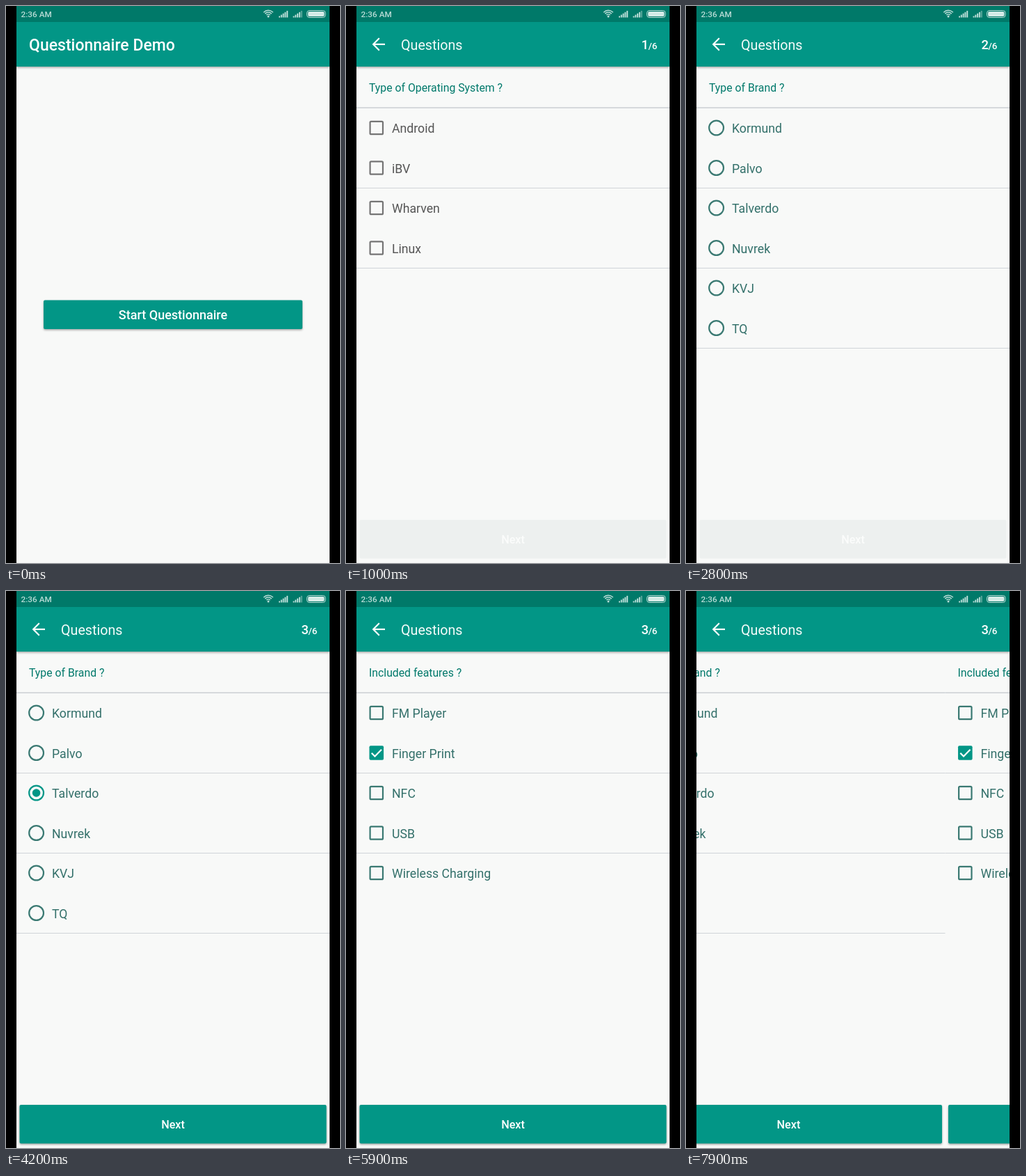
An HTML page with a canvas that plays this animation: 480x800 px, repeating every 8000 ms.

```html
<!DOCTYPE html>
<html lang="en">
<head>
<meta charset="utf-8">
<title>Questionnaire Demo</title>
<style>
  html, body { margin: 0; height: 100%; overflow: hidden; background: #000; }
  canvas { display: block; }
</style>
</head>
<body>
<canvas id="stage" width="480" height="800"></canvas>
<script>
const ctx = document.getElementById('stage').getContext('2d');

const LOOP = 8000, STEP = 100;
const LEFT = 15, RIGHT = 465, WIDTH = RIGHT - LEFT;
const TEAL = '#029686', DARK_TEAL = '#007969', PAPER = '#f8f9f8', LINE = '#d0d4d8';

// Times of the taps and the page changes, in ms
const OPEN = 560, TO_BRAND = 2300, TO_FEATURES = 4200, BACK = 6300, FORWARD = 7891;

const pages = [
  { question: 'Type of Operating System ?', pick: 0, tap: 1600, presses: [2050],
    options: ['Android', 'iBV', 'Wharven', 'Linux'] },
  { question: 'Type of Brand ?', radio: true, pick: 2, tap: 3400, presses: [3850, 7450],
    options: ['Kormund', 'Palvo', 'Talverdo', 'Nuvrek', 'KVJ', 'TQ'] },
  { question: 'Included features ?', pick: 1, tap: 5200, presses: [],
    options: ['FM Player', 'Finger Print', 'NFC', 'USB', 'Wireless Charging'] },
];

const progress = (t, start, length) => Math.min(1, Math.max(0, (t - start) / length));
const easeOut = (p, power) => 1 - (1 - p) ** power;
const scrollTo = (t, start) => easeOut(progress(t, start, 200), 5);
const pressTint = (t, start) => 0.1 * Math.sin(Math.PI * progress(t, start, 250));

function text(string, x, y, size, color, { weight = 400, align = 'left' } = {}) {
  ctx.font = `${weight} ${size}px Roboto, sans-serif`;
  ctx.textAlign = align;
  ctx.fillStyle = color;
  ctx.fillText(string, x, y);
}

function rect(x, y, w, h, color) {
  ctx.fillStyle = color;
  ctx.fillRect(x, y, w, h);
}

function roundRect(x, y, w, h, radius) {
  ctx.beginPath();
  ctx.roundRect(x, y, w, h, radius);
}

function disc(x, y, r, color) {
  ctx.beginPath();
  ctx.arc(x, y, r, 0, 2 * Math.PI);
  ctx.fillStyle = color;
  ctx.fill();
}

function polyline(points, color, width) {
  ctx.beginPath();
  points.forEach(([x, y]) => ctx.lineTo(x, y));
  ctx.strokeStyle = color;
  ctx.lineWidth = width;
  ctx.stroke();
}

function withShadow(draw) {
  ctx.save();
  ctx.shadowColor = 'rgba(0,0,0,.35)';
  ctx.shadowBlur = 3;
  ctx.shadowOffsetY = 1.5;
  draw();
  ctx.restore();
}

function shifted(dx, draw) {
  ctx.save();
  ctx.translate(dx, 0);
  draw();
  ctx.restore();
}

function button(x, y, w, h, label, baseline, size, enabled, tint) {
  const fill = () => { roundRect(x, y, w, h, 2); ctx.fill(); };
  ctx.fillStyle = enabled ? TEAL : '#edf0ef';
  if (enabled) withShadow(fill); else fill();
  if (tint) {
    ctx.fillStyle = `rgba(0,0,0,${tint})`;
    fill();
  }
  text(label, 240, baseline, size, enabled ? '#fff' : '#fbfcfb', { weight: 500, align: 'center' });
}

function windowFrame() {
  rect(LEFT, 0, WIDTH, 800, PAPER);
  rect(LEFT, 0, WIDTH, 23, DARK_TEAL);
}

function toolbar() {
  withShadow(() => rect(LEFT, 23, WIDTH, 64, TEAL));
  rect(LEFT, 0, WIDTH, 23, DARK_TEAL);
}

function startScreen(t) {
  windowFrame();
  toolbar();
  text('Questionnaire Demo', 33, 64, 23, '#fff', { weight: 500 });
  button(54, 422.5, 372, 41.5, 'Start Questionnaire', 450, 18, true, pressTint(t, 80));
}

function checkbox(y, color, checked, age) {
  if (!checked) {
    roundRect(34.6, y - 9.2, 18.4, 18.4, 1.5);
    ctx.strokeStyle = color;
    ctx.lineWidth = 2.2;
    ctx.stroke();
    return;
  }
  const size = age < 200 ? 19.5 : 20.6;
  roundRect(43.8 - size / 2, y - size / 2, size, size, 2);
  ctx.fillStyle = TEAL;
  ctx.fill();
  const tick = progress(age, 100, 200);
  if (!tick) return;
  ctx.save();
  ctx.beginPath();
  ctx.rect(34, y - 10, 20 * tick, 20);
  ctx.clip();
  polyline([[36.8, y + 0.3], [41.5, y + 5], [51, y - 4.8]], '#fff', 2.2);
  ctx.restore();
}

function radioButton(y, color, checked, age) {
  ctx.beginPath();
  ctx.arc(43.6, y, 10.4, 0, 2 * Math.PI);
  ctx.strokeStyle = checked ? TEAL : color;
  ctx.lineWidth = 2.2;
  ctx.stroke();
  if (checked) disc(43.6, y, 5.8 * progress(age, -100, 200), TEAL);
}

function questionPage(page, t) {
  const age = t - page.tap;
  const answered = age >= 0;
  const fresh = t < 1300;
  const labelColor = fresh ? '#555' : '#33706a';
  const boxColor = fresh ? '#757575' : '#3a7972';

  text(page.question, 33, 122.6, 15.8, '#00796b');
  rect(LEFT, 145.3, WIDTH, 1.7, LINE);

  page.options.forEach((label, i) => {
    const y = 175 + 57.5 * i;
    const picked = answered && i === page.pick;
    if (picked && age < 500) {
      const alpha = 0.13 * (1 - progress(age, 150, 350));
      disc(47, y, 18.5 * progress(age, -100, 200), `rgba(2,150,134,${alpha})`);
    }
    (page.radio ? radioButton : checkbox)(y, boxColor, picked, age);
    text(label, 66, y + 7, 17.7, labelColor);
    if (i % 2) rect(LEFT, Math.floor(y + 28.7), WIDTH, 1, LINE);
  });

  const tint = Math.max(0, ...page.presses.map(start => pressTint(t, start)));
  button(19.5, 738, 441, 55.5, 'Next', 772, 16.2, answered, tint);
}

function questionsScreen(t) {
  windowFrame();
  const position = scrollTo(t, TO_BRAND) + scrollTo(t, TO_FEATURES)
                 - scrollTo(t, BACK) + scrollTo(t, FORWARD);
  pages.forEach((page, i) => {
    const distance = i - position;
    if (Math.abs(distance) < 1) shifted(distance * WIDTH, () => questionPage(page, t));
  });

  toolbar();
  polyline([[56, 55], [39.5, 55]], '#fff', 2.2);
  polyline([[47.8, 46.3], [39.2, 55], [47.8, 63.7]], '#fff', 2.2);
  text('Questions', 79, 62.6, 19.7, '#f4fbfa');
  const number = 1 + (t >= TO_BRAND) + (t >= TO_FEATURES) - (t >= BACK) + (t >= FORWARD);
  text(number, 434.8, 62, 18.3, '#fff', { weight: 500, align: 'right' });
  text('/6', 447.3, 62, 13.3, '#fff', { weight: 500, align: 'right' });
}

function statusIcons() {
  const color = '#b9dcd6';
  text('2:36 AM', 21.5, 16, 11.8, color, { weight: 500 });

  ctx.strokeStyle = color;
  ctx.lineWidth = 1.5;
  for (const r of [3.6, 6.4, 9.2]) {
    ctx.beginPath();
    ctx.arc(377, 15.5, r, -Math.PI * 0.76, -Math.PI * 0.24);
    ctx.stroke();
  }
  disc(377, 15, 1.5, color);

  for (const [x, strength] of [[392, 5], [412.5, 4]]) {
    for (let i = 0; i < 5; i++) {
      const h = 2 + i * 1.9;
      rect(x + i * 2.8, 16.5 - h, 2, h, i < strength ? color : '#5fa99e');
    }
  }

  roundRect(432.5, 6.5, 26.5, 10, 3.5);
  ctx.lineWidth = 1;
  ctx.stroke();
  roundRect(434, 8, 23.5, 7, 2);
  ctx.fillStyle = '#d5ebe7';
  ctx.fill();
}

function draw(t) {
  rect(0, 0, 480, 800, '#000');
  ctx.save();
  ctx.beginPath();
  ctx.rect(LEFT, 0, WIDTH, 800);
  ctx.clip();

  const opened = easeOut(progress(t, OPEN, 355), 2);
  if (opened < 1) {
    shifted(-100 * opened, () => startScreen(t));
    rect(LEFT, 0, WIDTH, 800, `rgba(0,0,0,${0.35 * opened})`);
  }
  if (opened > 0) {
    shifted(Math.round(WIDTH * (1 - opened)), () => {
      ctx.beginPath();
      ctx.rect(LEFT, 0, WIDTH, 800);
      ctx.clip();
      questionsScreen(t);
    });
  }
  statusIcons();
  ctx.restore();
}

const began = performance.now();
function tick() {
  const t = (performance.now() - began) % LOOP;
  draw(Math.floor(t / STEP) * STEP);
  requestAnimationFrame(tick);
}
tick();
</script>
</body>
</html>
```
